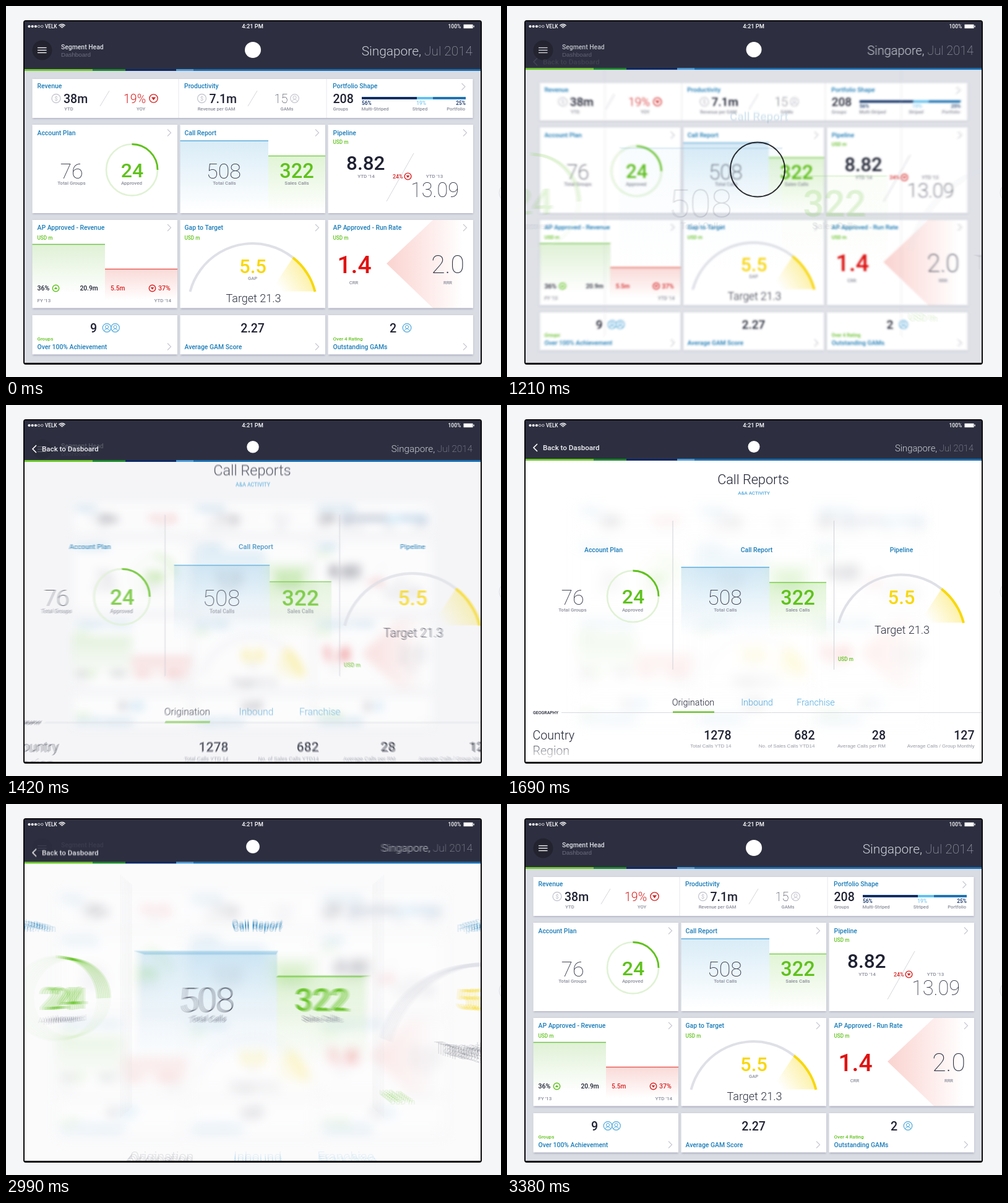
An HTML page with a canvas that plays this animation: 800 px wide and 600 px high, repeating every 3.41 s.

```html
<!DOCTYPE html>
<html lang="en">
<head>
<meta charset="utf-8">
<title>Dashboard transition</title>
<style>
  html, body { margin: 0; width: 100%; height: 100%; overflow: hidden; background: #f5f6f8; }
  canvas { display: block; }
</style>
</head>
<body>
<canvas id="stage" width="800" height="600"></canvas>
<script>
const LOOP = 3410, OPEN_AT = 1000, CLOSE_AT = 2690, TRAVEL = 690, TICK = 30;
const SHUTTER = 17 / TRAVEL, SAMPLES = 8;
const INK = '#1f2233', THIN_INK = '#2c2f40', GREY = '#8b8d9b', PALE = '#c6c7d0', BLUE = '#1b7db9',
      SKY = '#4fa9dc', NAVY = '#0c2f66', GREEN = '#5fc21b', RED = '#d92222', YELLOW = '#f8d80c';
const MEDIUM = 500, REGULAR = 400, LIGHT = 300, THIN = 100;

function makeCanvas(scale) {
  const canvas = document.createElement('canvas');
  canvas.width = 800 * scale;
  canvas.height = 600 * scale;
  canvas.getContext('2d').scale(scale, scale);
  return canvas;
}
const stage = document.getElementById('stage').getContext('2d');
const sample = makeCanvas(1), cardLayer = makeCanvas(2);
let ctx = cardLayer.getContext('2d');

const mix = (a, b, k) => a + (b - a) * k;
const smooth = (a, b, x) => {
  const k = Math.min(1, Math.max(0, (x - a) / (b - a)));
  return k * k * (3 - 2 * k);
};

// Cubic Bezier easing with control points (a, 0) and (b, 1).
function ease(x, a, b) {
  let low = 0, high = 1, s = .5;
  for (let i = 0; i < 24; i++) {
    s = (low + high) / 2;
    const at = 3 * a * s * (1 - s) ** 2 + 3 * b * s * s * (1 - s) + s ** 3;
    if (at < x) low = s; else high = s;
  }
  return s * s * (3 - 2 * s);
}

// y is the middle of the capital letters
function text(str, x, y, size, color, weight = MEDIUM, align = 'left') {
  const family = weight === REGULAR ? '"Liberation Sans"' : 'Roboto';
  ctx.font = `${weight} ${size}px ${family}, sans-serif`;
  ctx.textAlign = align;
  ctx.fillStyle = color;
  ctx.fillText(str, x, y + size * .36);
}
const centered = (str, x, y, size, color, weight) => text(str, x, y, size, color, weight, 'center');
const caption = (str, x, y, size = 8) => centered(str, x, y, size, GREY);
const title = (str, x, y) => text(str, x, y, 10.4, BLUE);
const unit = (x, y) => text('USD m', x, y, 8.2, GREEN);

function line(color, width, ...points) {
  ctx.beginPath();
  for (let i = 0; i < points.length; i += 2) ctx.lineTo(points[i], points[i + 1]);
  ctx.strokeStyle = color;
  ctx.lineWidth = width;
  ctx.stroke();
}
function arc(x, y, r, color, width, from = 0, to = 2 * Math.PI) {
  ctx.beginPath();
  ctx.arc(x, y, r, from, to);
  ctx.strokeStyle = color;
  ctx.lineWidth = width;
  ctx.stroke();
}
function disc(x, y, r, color) {
  ctx.beginPath();
  ctx.arc(x, y, r, 0, 2 * Math.PI);
  ctx.fillStyle = color;
  ctx.fill();
}
function rect(x, y, w, h, color) {
  ctx.fillStyle = color;
  ctx.fillRect(x, y, w, h);
}
function polygon(fill, ...points) {
  ctx.beginPath();
  for (let i = 0; i < points.length; i += 2) ctx.lineTo(points[i], points[i + 1]);
  ctx.fillStyle = fill;
  ctx.fill();
}
function fadeFill(x0, y0, x1, y1, rgb, alpha) {
  const gradient = ctx.createLinearGradient(x0, y0, x1, y1);
  gradient.addColorStop(0, `rgba(${rgb},${alpha})`);
  gradient.addColorStop(1, `rgba(${rgb},0)`);
  return gradient;
}
function area(x, y, w, h, rgb) {
  rect(x, y, w, h, fadeFill(0, y, 0, y + h, rgb, .2));
  rect(x, y - .75, w, 1.5, `rgba(${rgb},.85)`);
}

const chevron = (x, y) => line(PALE, 1.1, x - 2.5, y - 5.5, x + 3, y, x - 2.5, y + 5.5);
const slash = (x, y, dx, dy) => line('#d5d6dd', 1, x + dx, y - dy, x - dx, y + dy);
function trend(x, y, r, color, dir) {
  arc(x, y, r, color, 1.4);
  polygon(color, x - r * .55, y - dir * r * .3, x + r * .55, y - dir * r * .3, x, y + dir * r * .45);
}
function coin(x, y) {
  arc(x, y, 7, PALE, 1.3);
  centered('$', x, y, 9, PALE);
}
function person(x, y, color) {
  arc(x, y, 6.8, color, 1.2);
  arc(x, y - 1.5, 2.6, color, 1);
  arc(x, y + 6, 4.4, color, 1, Math.PI * 1.1, Math.PI * 1.9);
}
function card(x, y, w, h) {
  ctx.save();
  ctx.shadowColor = 'rgba(60,65,95,.35)';
  ctx.shadowBlur = 3;
  ctx.shadowOffsetY = 1;
  rect(x, y, w, h, '#fff');
  ctx.restore();
}

// Parts shared by both screens
function planStats(y) {
  centered('76', 106, y + 1.5, 34, THIN_INK, THIN);
  caption('Total Groups', 106, y + 21.5);
  arc(203.5, y, 41.5, '#e0f2d4', 2.6);
  arc(203.5, y, 41.5, GREEN, 2.8, -Math.PI / 2, 0);
  centered('24', 204, y, 32, GREEN);
  caption('Approved', 203, y + 21.5);
}
function callStats(y) {
  area(281.5, y - 47, 142.5, 112, '66,160,214');
  area(424, y - 22.5, 92, 90, '104,200,50');
  centered('508', 352, y + 1.5, 34, THIN_INK, THIN);
  caption('Total Calls', 353, y + 21.5);
  centered('322', 470, y + 1.5, 32.5, GREEN);
  caption('Sales Calls', 470, y + 21.5);
}
function gauge(x, y) {
  const r = 104.4, end = .256, split = -.897;
  polygon(fadeFill(x + 88, y - 62, x + 42, y - 32, '248,216,12', .38),
    x + 65, y - 81, x + 86, y - 57, x + 100, y - 27, x + 29, y - 27);
  arc(x, y, r, '#dfe0e7', 4, Math.PI + end, split);
  arc(x, y, r, YELLOW, 4, split, -end);
  centered('5.5', x + .5, y - 68, 31, YELLOW);
  centered('Target 21.3', x + 1.5, y - 15.5, 18, THIN_INK, LIGHT);
}

function drawSummary() {
  card(42.5, 118, 712, 63);
  line('#e6e7ec', 1, 279, 118, 279, 181);
  line('#e6e7ec', 1, 518, 118, 518, 181);
  title('Revenue', 50.5, 129.5);
  coin(81, 149.5);
  text('38m', 93, 149.5, 19.5, INK);
  caption('YTD', 101.5, 166.5, 7.6);
  slash(159.5, 149.5, 7.5, 12.5);
  text('19%', 190, 149.5, 19.5, RED, LIGHT);
  trend(238.5, 149.5, 6.6, RED, 1);
  caption('YOY', 218, 166.5, 7.6);

  title('Productivity', 288, 129.5);
  coin(316.5, 149.5);
  text('7.1m', 328.5, 149.5, 19.5, INK);
  caption('Revenue per GAM', 340, 166.5, 7.6);
  slash(398.5, 149.5, 7.5, 12.5);
  text('15', 433.5, 149.5, 20, THIN_INK, THIN);
  person(466.5, 149.5, PALE);
  caption('GAMs', 454, 166.5, 7.6);

  title('Portfolio Shape', 528, 129.5);
  chevron(739, 130.5);
  text('208', 528.5, 149.5, 19.5, INK);
  text('Groups', 528.5, 166.5, 7.6, GREY);
  rect(575, 147, 89, 4, NAVY);
  rect(664, 147, 26, 4, '#62c1ef');
  rect(690, 147, 53, 4, '#1e74b4');
  text('56%', 575, 156.5, 8.4, NAVY);
  centered('19%', 671, 156.5, 8.4, '#7fccf2');
  text('25%', 743, 156.5, 8.4, NAVY, MEDIUM, 'right');
  text('Multi-Striped', 574.5, 166.5, 7.6, GREY);
  caption('Striped', 669, 166.5, 7.6);
  text('Portfolio', 742, 166.5, 7.6, GREY, MEDIUM, 'right');
}

function drawCards() {
  drawSummary();
  for (const x of [42.5, 281.5, 520.5]) {
    card(x, 192, 234.5, 143);
    card(x, 346, 234.5, 142.5);
    card(x, 500, 234.5, 63.5);
    for (const y of [205, 358.5, 551]) chevron(x + 221, y);
  }

  title('Account Plan', 50.5, 205);
  planStats(265);
  title('Call Report', 288.5, 205);
  callStats(265);

  title('Pipeline', 528.5, 205);
  unit(528.5, 220);
  text('8.82', 550, 253.5, 31.5, INK);
  caption("YTD '14", 582, 275.5);
  slash(637, 277, 22, 39);
  text('24%', 625, 275.5, 8.8, RED);
  trend(649.5, 275.5, 5.4, RED, 1);
  caption("YTD '13", 692.5, 275.5);
  centered('13.09', 693, 297, 32.5, THIN_INK, THIN);

  title('AP Approved - Revenue', 50.5, 358.5);
  unit(50.5, 375);
  area(42.5, 385.5, 117.5, 80, '96,186,50');
  area(160, 425.5, 117, 50, '226,72,60');
  text('36%', 50.5, 456.5, 10.6, INK);
  trend(80.5, 456.5, 5.2, GREEN, -1);
  text('20.9m', 119.5, 456.5, 10.2, INK);
  text('5.5m', 169, 456.5, 10.2, RED);
  trend(236.5, 456.5, 5.2, RED, 1);
  text('37%', 246, 456.5, 10.6, RED);
  text("FY '13", 50.5, 476.5, 8, GREY);
  text("YTD '14", 267, 476.5, 8, GREY, MEDIUM, 'right');

  title('Gap to Target', 288.5, 358.5);
  unit(288.5, 375);
  gauge(398.5, 488.5);
  caption('GAP', 398.5, 440.5, 7.6);

  title('AP Approved - Run Rate', 528.5, 358.5);
  unit(528.5, 375);
  polygon(fadeFill(615, 0, 738, 0, '236,80,66', .25),
    615, 416.5, 690, 346, 755, 346, 755, 488.5, 690, 488.5);
  centered('1.4', 563, 417.5, 39, '#e01212');
  caption('CRR', 562, 447.5, 7.6);
  centered('2.0', 714, 417.5, 41, THIN_INK, THIN);
  caption('RRR', 714, 447.5, 7.6);

  text('9', 136, 520.5, 19.5, INK);
  person(163, 520.5, SKY);
  person(176.5, 520.5, SKY);
  text('Groups', 50.5, 538, 8, GREEN);
  title('Over 100% Achievement', 50.5, 551);
  centered('2.27', 398.5, 520.5, 19.5, INK);
  title('Average GAM Score', 288.5, 551);
  text('2', 620, 520.5, 19.5, INK);
  person(648, 520.5, SKY);
  text('Over 4 Rating', 528.5, 538, 8, GREEN);
  title('Outstanding GAMs', 528.5, 551);
}

function drawDetail() {
  centered('Call Reports', 398, 120.5, 21.7, INK, LIGHT);
  centered('A&A ACTIVITY', 399, 142, 7.9, SKY);
  line('#d0d1d8', 1, 268, 187, 268, 428);
  line('#d0d1d8', 1, 528.5, 187, 528.5, 428);
  centered('Account Plan', 156, 234.5, 10.4, BLUE);
  centered('Call Report', 403.5, 234.5, 10.4, BLUE);
  centered('Pipeline', 637.5, 234.5, 10.4, BLUE);
  planStats(309.5);
  callStats(309.5);
  gauge(637, 379);
  unit(535, 411.5);

  centered('Origination', 301, 481, 14.4, INK, LIGHT);
  centered('Inbound', 404, 481, 14.4, SKY, LIGHT);
  centered('Franchise', 499, 481, 14.4, SKY, LIGHT);
  text('GEOGRAPHY', 42, 497.5, 7, INK);
  line('#d8d9df', 1, 88, 497.5, 767, 497.5);
  rect(268, 495.5, 67, 2.2, GREEN);
  text('Country', 41.5, 533.5, 19.6, INK, LIGHT);
  text('Region', 41.5, 559, 19.6, fadeFill(0, 545, 0, 577, '31,34,51', .85), LIGHT);
  const figures = [
    ['1278', 'Total Calls YTD 14', 362.5], ['682', 'No. of Sales Calls YTD14', 497.5],
    ['28', 'Average Calls per RM', 612], ['127', 'Average Calls / Group Monthly', 755.5]];
  for (const [value, label, right] of figures) {
    text(value, right, 533.5, 19.5, INK, MEDIUM, 'right');
    text(label, right, 551.5, 8, '#9799a5', REGULAR, 'right');
  }
}

function drawStatus() {
  for (let i = 0; i < 5; i++) {
    if (i < 3) disc(37.5 + i * 5.2, 33, 2.1, '#fff');
    else arc(37.5 + i * 5.2, 33, 1.8, '#fff', .7);
  }
  text('VELK', 63, 33, 8.2, '#fff');
  for (const r of [2, 4.5, 7]) arc(90.5, 36.5, r, '#fff', 1.4, -Math.PI * .76, -Math.PI * .24);
  centered('4:21 PM', 398.5, 32.5, 9.3, '#fff');
  text('100%', 714.5, 33, 8.5, '#fff');
  rect(739.5, 29.8, 15, 6.4, '#fff');
  rect(755.3, 31.6, 1.4, 2.8, '#fff');
}

function drawHeader(p, fade) {
  const edge = Math.round(102.4 - 15 * p);
  rect(30, 25, 737, edge - 25, '#2d2f40');
  const stripes = [[30, '#6cc82a'], [140, '#1c8a2c'], [193, '#0d2a66'], [275, '#4a9bd9'], [303, '#1a70b4']];
  stripes.forEach(([x, color], i) => rect(x, edge, (stripes[i + 1]?.[0] ?? 767) - x, 3, color));
  drawStatus();
  disc(399, mix(71, 67.5, p), mix(13, 9.5, p), '#fff');

  ctx.globalAlpha = 1 - fade;
  disc(58.5, 71.5, 16, '#22232e');
  for (const y of [67.5, 71.5, 75.5]) line('#fff', 1.3, 51, y, 65.5, y);
  text('Segment Head', 89, 66.5, 10.4, '#dcdde4');
  text('Dashboard', 89, 78, 9.8, '#6d6f80', REGULAR);

  ctx.globalAlpha = smooth(0, .7, p);
  const y = 69 + 25 * (1 - p);
  line('#fff', 1.6, 49, y - 6, 43, y, 49, y + 6);
  text('Back to Dasboard', 58, y, 11.6, '#f2f2f6');
  ctx.globalAlpha = 1;

  const size = mix(20.9, 14.8, p), dateY = mix(72.5, 70, p);
  text('Jul 2014', 754, dateY, size, '#aeb0bd', THIN, 'right');
  text('Singapore, ', 754 - ctx.measureText('Jul 2014').width, dateY, size, '#cfd0d9', LIGHT, 'right');
}

function zoomAbout(x, y, scale) {
  ctx.translate(x, y);
  ctx.scale(scale, scale);
  ctx.translate(-x, -y);
}

// u runs from 0 to 1 within one transition, opening or closing the detail screen.
function drawScene(u, opening) {
  const p = opening ? ease(u, .7, 0) : 1 - ease(u, .7, .2);
  const fade = opening ? smooth(.12, .85, u) : 1 - smooth(.3, 1, u);

  rect(0, 0, 800, 600, '#f5f6f8');
  arc(812, 302, 15, '#dcdee3', 1);
  ctx.beginPath();
  ctx.roundRect(28, 23, 741, 557, 4);
  ctx.fillStyle = '#08080b';
  ctx.fill();

  ctx.save();
  ctx.beginPath();
  ctx.rect(30, 25, 737, 552);
  ctx.clip();
  rect(30, 25, 737, 552, '#fff');
  ctx.globalAlpha = 1 - fade;
  rect(30, 25, 737, 552, '#dadce4');

  ctx.save();
  ctx.globalAlpha = 1 - .6 * fade * fade;
  zoomAbout(398, 336, 1 - .2 * p);
  if (p < .001) {
    drawCards();
  } else {
    if (fade > 0) ctx.filter = `blur(${(10 * fade).toFixed(2)}px)`;
    ctx.drawImage(cardLayer, 0, 0, 800, 600);
  }
  ctx.restore();

  if (fade > 0) {
    ctx.save();
    ctx.globalAlpha = fade;
    zoomAbout(399, 301.5, 1 + (opening ? .98 : 1.44) * (1 - p));
    drawDetail();
    ctx.restore();
  }
  ctx.globalAlpha = 1;
  drawHeader(p, fade);
  ctx.restore();
}

function drawTouch(x, y, elapsed) {
  const width = 10 * (1 - elapsed / 260);
  if (width <= 0) return;
  const outer = 10 + 35 * elapsed / 210;
  arc(x, y, outer - width / 2, 'rgba(8,8,12,.85)', width);
}

function drawAt(time) {
  const opening = time < CLOSE_AT;
  const elapsed = time - (opening ? OPEN_AT : CLOSE_AT);
  const u = Math.min(1, Math.max(0, elapsed / TRAVEL));
  const count = u > 0 && u < 1 ? SAMPLES : 1;

  // Average several moments around u for motion blur.
  for (let i = 0; i < count; i++) {
    const offset = count > 1 ? (i / (count - 1) - .5) * SHUTTER : 0;
    ctx = sample.getContext('2d');
    drawScene(Math.min(1, Math.max(0, u + offset)), opening);
    stage.globalAlpha = 1 / (i + 1);
    stage.drawImage(sample, 0, 0);
  }
  stage.globalAlpha = 1;
  ctx = stage;
  if (elapsed >= 0) drawTouch(...(opening ? [405, 264.5] : [102, 70.5]), elapsed);
}

function stepTime(time) {
  const start = time < OPEN_AT ? 0 : time < CLOSE_AT ? OPEN_AT : CLOSE_AT;
  if (!start) return 0;
  return start + Math.min(TRAVEL, Math.floor((time - start) / TICK) * TICK);
}

drawCards();
let shown = -1;
function frame() {
  const time = stepTime(performance.now() % LOOP);
  if (time !== shown) drawAt(shown = time);
  requestAnimationFrame(frame);
}
frame();
</script>
</body>
</html>
```
